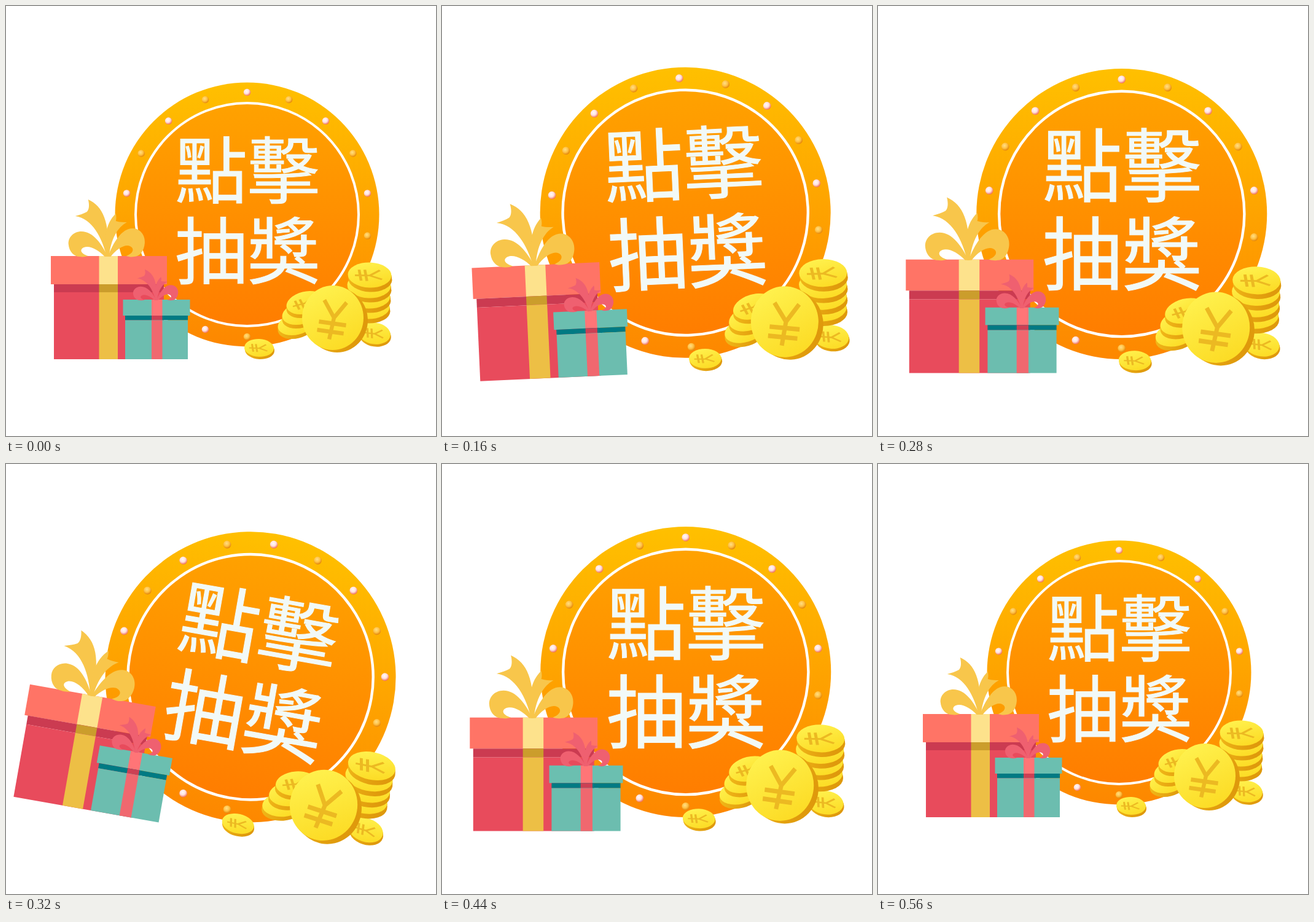
Write an HTML page that moves like this. It is 700x700 px and loops after 3 s.

```html
<!DOCTYPE html>
<html lang="zh-TW">
<head>
<meta charset="utf-8">
<style>
  html, body { margin: 0; width: 100%; height: 100%; overflow: hidden; background: #fff; }
  svg { display: block; width: 100%; height: 100%; }
  text {
    font: 400 118px "Noto Sans CJK TC", "Noto Sans CJK", "Noto Sans CJK SC", sans-serif;
    text-anchor: middle; fill: #f2f9f7; stroke: #f2f9f7;
  }
</style>
</head>
<body>
<svg viewBox="0 0 700 700">
  <defs>
    <linearGradient id="rim" x2="0" y2="1">
      <stop stop-color="#ffc000"/><stop offset="1" stop-color="#fd8700"/>
    </linearGradient>
    <linearGradient id="plate" x2="0" y2="1">
      <stop stop-color="#ffa200"/><stop offset="1" stop-color="#ff7d00"/>
    </linearGradient>
    <linearGradient id="gold" x1=".2" x2=".7" y2="1">
      <stop stop-color="#fff250"/><stop offset="1" stop-color="#fcdb24"/>
    </linearGradient>
    <linearGradient id="edge" x2="1" y2=".5">
      <stop stop-color="#f6c01c"/><stop offset="1" stop-color="#df990c"/>
    </linearGradient>
    <radialGradient id="pink" cx=".4" cy=".36" r=".64">
      <stop stop-color="#fffafa"/><stop offset=".55" stop-color="#ffe0dc"/><stop offset="1" stop-color="#f0715c"/>
    </radialGradient>
    <radialGradient id="amber" cx=".4" cy=".36" r=".64">
      <stop stop-color="#ffde86"/><stop offset=".55" stop-color="#ffc246"/><stop offset="1" stop-color="#e4860a"/>
    </radialGradient>
    <path id="yen" d="M-14-28 2 0 23-24M2 0-6 34M-23 6 22 12M-26 19 18 25" fill="none" stroke="#ecb922" stroke-width="6.500"/>
    <path id="loop" fill-rule="evenodd" d="M0 0C-10-21-24-41-43-41C-56-41-65-31-64-20C-63-8-55 0-46 0C-40 1-36 0-32-1C-45-5-46-12-39-15C-30-19-15-11-5 0Z"/>
    <!-- bow, knot at the origin -->
    <g id="bow">
      <use href="#loop"/>
      <use href="#loop" transform="scale(-.94 1.12)"/>
      <path d="M-2 0C-9-30-25-62-53-66C-46-68-39-70-34-73C-30-77-30-85-32-93C-8-82 3-58 1 0Z"/>
      <path d="M-2 0C-7-30-3-55 13-70C14-65 14-61 13-58C19-56 25-56 31-56C16-48 5-29 2 0Z"/>
    </g>
  </defs>
  <g id="scene"></g>
</svg>
<script>
const scene = document.getElementById('scene');
const CX = 392.5, CY = 339.5;

const disc = (r, paint) => `<circle cx="${CX}" cy="${CY}" r="${r}" ${paint}/>`;
const rect = (x, y, w, h, fill) => `<rect x="${x}" y="${y}" width="${w}" height="${h}" fill="${fill}"/>`;

function bulbs() {
  let out = '';
  for (let i = 0; i < 18; i++) {
    const a = i * Math.PI / 9;
    const x = CX + 199 * Math.sin(a), y = CY - 199 * Math.cos(a);
    out += `<circle cx="${x}" cy="${y}" r="5.8" fill="url(#${i % 2 ? 'amber' : 'pink'})"/>`;
  }
  return out;
}

// A pile of n coins, top face at (x, y); each lower coin is one step further
function pile({ x, y, rx, ry, tilt = 0, turn = 75, depth = [1, 4], n = 1, step = [0, 0] }) {
  let out = '';
  for (let i = n - 1; i >= 0; i--) {
    const cx = x + i * step[0], cy = y + i * step[1];
    const oval = (k, fill) => `<ellipse rx="${rx}" ry="${ry}" fill="url(#${fill})"
      transform="translate(${cx + k * depth[0]} ${cy + k * depth[1]}) rotate(${tilt})"/>`;
    out += oval(1, 'edge') + oval(.5, 'edge') + oval(0, 'gold');
  }
  return out + `<use href="#yen"
    transform="translate(${x} ${y}) rotate(${tilt}) scale(${rx / 51} ${ry / 51}) rotate(${turn})"/>`;
}

// Box with a lid, a shadow strip, a ribbon and a bow; colours run lid, strip, body
function gift({ x, y, w, lid, strip, body, inset, ribbon, band, paint, ribbonPaint, bow, bowSize }) {
  const heights = [lid, strip, body];
  let out = '', top = y;
  heights.forEach((h, i) => {
    const gap = i ? inset : 0;
    out += rect(x + gap, top, w - 2 * gap, h, paint[i]) + rect(ribbon, top, band, h, ribbonPaint[i]);
    top += h;
  });
  return out + `<use href="#bow" fill="${bow}"
    transform="translate(${ribbon + band / 2 - 1} ${y + 1}) scale(${bowSize})"/>`;
}

scene.innerHTML =
  disc(215, 'fill="url(#rim)"') +
  disc(181.5, 'fill="url(#plate)" stroke="#fff" stroke-width="4"') +
  bulbs() +
  '<text x="393" y="311.500">點擊</text><text x="393" y="442.500">抽獎</text>' +
  pile({ x: 600, y: 533, rx: 26, ry: 17.5, tilt: 8 }) +
  pile({ x: 592, y: 438, rx: 35.5, ry: 20.5, tilt: 2, depth: [1, 7], n: 4, step: [-1, 17] }) +
  pile({ x: 487, y: 483, rx: 31, ry: 18, tilt: -14, depth: [0, 6], n: 3, step: [-7, 17] }) +
  pile({ x: 412, y: 556.5, rx: 24, ry: 14.5, tilt: 3 }) +
  pile({ x: 532, y: 507.5, rx: 50, ry: 52.5, turn: 0, depth: [7, 4] }) +
  gift({
    x: 73, y: 407, w: 189, lid: 46, strip: 13, body: 109, inset: 5, ribbon: 151.5, band: 30.5,
    paint: ['#ff7466', '#cb3b51', '#e84b5c'], ribbonPaint: ['#fde28c', '#cb9d2c', '#edbf45'],
    bow: '#f8c64b', bowSize: 1
  }) +
  gift({
    x: 190.5, y: 478, w: 109, lid: 26, strip: 7.5, body: 63.5, inset: 3.5, ribbon: 237, band: 17.5,
    paint: ['#6bbfb0', '#007a83', '#6cbdaf'], ribbonPaint: ['#ff7577', '#cc4054', '#f0686f'],
    bow: '#ef6070', bowSize: '.59 .54'
  });

// Smooth rise from 0 to 1 between two times
function ramp(t, from, to) {
  const p = Math.min(1, Math.max(0, (t - from) / (to - from)));
  return p * p * (3 - 2 * p);
}

const start = performance.now();

function draw() {
  const elapsed = Math.max(0, performance.now() - start) % 3000;
  const t = Math.floor(elapsed / 40) * 40;
  const size = 1 + .1 * (ramp(t, 0, 120) - ramp(t, 440, 560));
  const angle = -10 * ramp(t, 120, 240) + 20 * ramp(t, 240, 320) - 10 * ramp(t, 320, 440);
  scene.setAttribute('transform',
    `translate(350 350) rotate(${angle}) scale(${size}) translate(-350 -350)`);
  requestAnimationFrame(draw);
}
draw();
</script>
</body>
</html>
```
